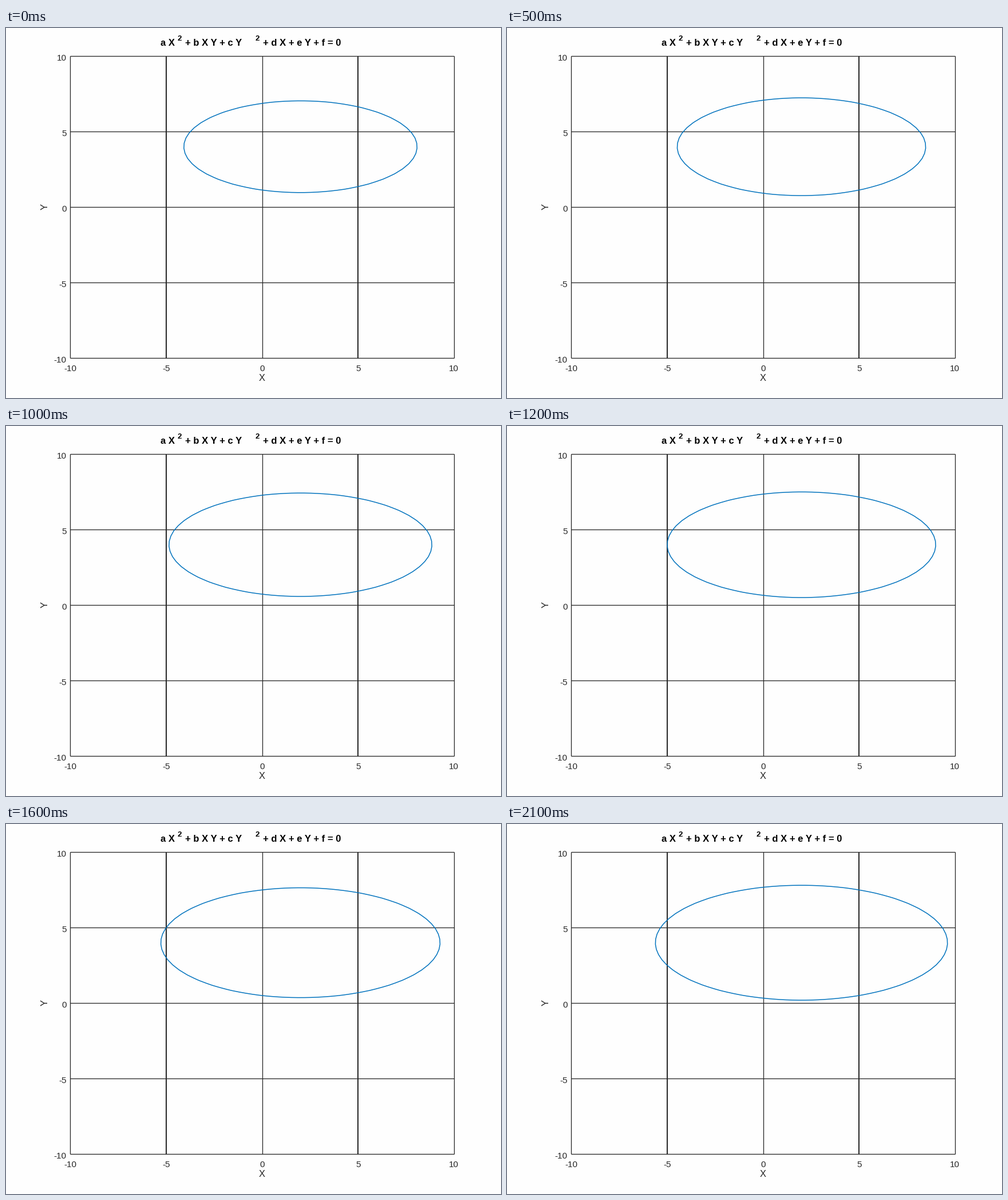
Animation of 865x647 px, one loop 2.2 s. Source, as a matplotlib script:

```python
import numpy as np
import matplotlib.pyplot as plt
from matplotlib.animation import ArtistAnimation

W, H, DPI = 865, 647, 100
FRAMES, STEP_MS = 22, 100
INK, BLUE = "#262626", "#0072bd"
PX = 72 / DPI  # points per pixel

fig = plt.figure(figsize=(W / DPI, H / DPI), dpi=DPI, facecolor="#fefefe")
ax = fig.add_axes([0, 0, 1, 1])
ax.set(xlim=(0, W), ylim=(H, 0))
ax.axis("off")


def to_x(x):
    return 447.5 + 33.52 * x


def to_y(y):
    return 313.2 - 26.4 * y


def label(x, y, s, size, **kw):
    style = dict(family="Liberation Sans", color=INK, ha="center", va="baseline")
    ax.text(x, y, s, fontsize=size * PX, **{**style, **kw})


def line(xs, ys, width):
    ax.plot(xs, ys, color=INK, lw=width * PX, solid_capstyle="butt", zorder=1)


# Grid, frame and tick labels
for v in range(-10, 11, 5):
    x, y = to_x(v), to_y(v)
    line([x, x], [to_y(10), to_y(-10)], 2 if abs(v) == 5 else 1.3)
    line([to_x(-10), to_x(10)], [y, y], 1.3)
    label(x, 599.5, str(v), 15.3)
    label(105.5, y + 7.5, str(v), 15.3, ha="right")

label(447.5, 617, "X", 16.5)
label(68.5, 313, "Y", 16.5, rotation=90, va="center")

# Title, with raised exponents
for x, y, s, size in [
    (270, 31, "a X", 16.6),
    (299, 22.5, "2", 13.3),
    (313, 31, "+ b X Y + c Y", 16.6),
    (435, 22.5, "2", 13.3),
    (449, 31, "+ d X + e Y + f = 0", 16.6),
]:
    label(x, y, s, size, ha="left", weight="bold", color="black")

# Ellipse (x - 2)^2 + 4 (y - 4)^2 = r2, traced on a coarse grid
axis = np.linspace(-10, 10, 60)
gx, gy = np.meshgrid(axis, axis)
conic = (gx - 2) ** 2 + 4 * (gy - 4) ** 2


def ellipse(r2):
    return ax.contour(to_x(gx), to_y(gy), conic - r2, levels=[0],
                      colors=BLUE, linewidths=1.5 * PX, zorder=2)


frames = [[ellipse(37 + i)] for i in range(FRAMES)]
ax.set(xlim=(0, W), ylim=(H, 0))

anim = ArtistAnimation(fig, frames, interval=STEP_MS, repeat=True,
                       repeat_delay=0, blit=False)
plt.show()
```
